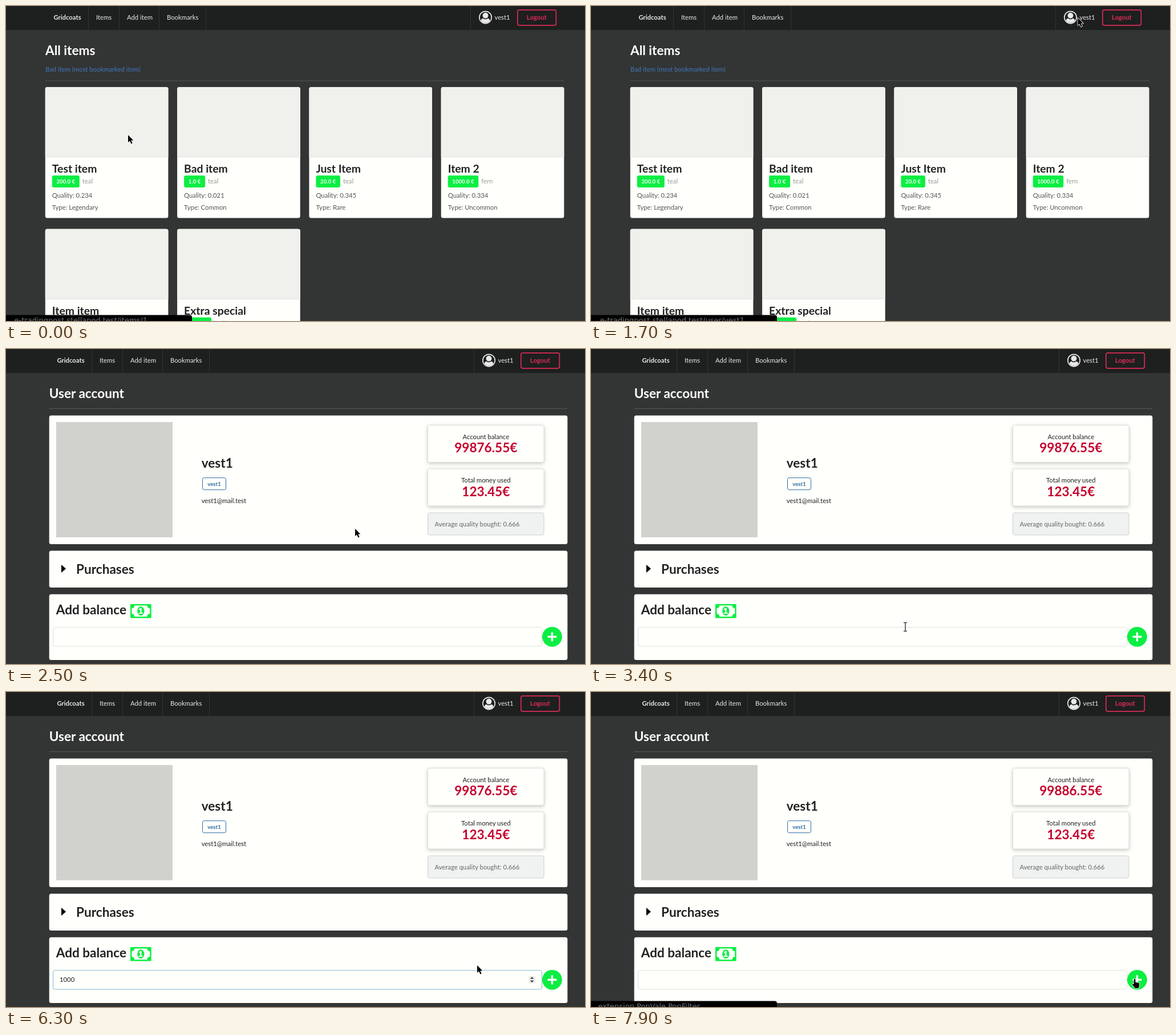
These frames come from a looping animation (1015 px wide and 552 px high, 8 s). An HTML page:

```html
<!DOCTYPE html>
<html lang="en">
<head>
<meta charset="utf-8">
<title>Marketplace account</title>
<style>
  html, body { margin: 0; width: 100%; height: 100%; overflow: hidden; background: #333434; }
  svg { display: block; width: 1015px; height: 552px; font-family: Lato, sans-serif; }
  .raised { filter: drop-shadow(0 2px 3px #22242640); }
  .pointer { fill: #000; stroke: #fff; stroke-width: 1.6; paint-order: stroke; stroke-linejoin: round; }
</style>
</head>
<body>
<svg id="stage" viewBox="0 0 1015 552"></svg>
<script>
const LOOP = 8000, BODY = 11.29, H1 = 22.58, H2 = 19.36, SMALL = 9.68;
const INK = '#212223', PAPER = '#fffffb', GREEN = '#0cee43', RED = '#c5002d', USER = 'vest1';
const HOST = 'e-tradingpost.stellapod.test/';

const text = (x, y, s, { size = BODY, fill = INK, bold, anchor = 'start', id = '' } = {}) =>
  `<text id="${id}" x="${x}" y="${y}" font-size="${size}" font-weight="${bold ? 700 : 400}" fill="${fill}" text-anchor="${anchor}">${s}</text>`;
const rect = (x, y, w, h, fill, r = 0, more = '') =>
  `<rect x="${x}" y="${y}" width="${w}" height="${h}" rx="${r}" fill="${fill}" ${more}/>`;

function nav() {
  const light = '#e9e9e9';
  return [144, 198, 268, 350, 814].map(x => rect(x, 0, 1, 42, '#313232')).join('') +
    text(107.5, 24, 'Gridcoats', { bold: 1, fill: light, anchor: 'middle' }) +
    text(158, 24, 'Items', { fill: light }) +
    text(212, 24, 'Add item', { fill: light }) +
    text(282, 24, 'Bookmarks', { fill: light }) +
    `<g transform="translate(829 8.5) scale(.01283)" fill="${light}">
      <circle cx="896" cy="896" r="832" fill="none" stroke="${light}" stroke-width="128"/>
      <circle cx="896" cy="640" r="384"/>
      <path d="M277 1351q66-327 306-327 131 128 313 128t313-128q240 0 306 327-240 313-619 313t-619-313z"/>
    </g>` +
    text(856.5, 24, USER, { fill: light }) +
    rect(896.8, 6.8, 67.5, 27, 'none', 3, 'stroke="#d92c56" stroke-width="1.7"') +
    text(930.3, 24, 'Logout', { bold: 1, fill: '#d92c56', anchor: 'middle' });
}

function card(col, row, title, price, seller, quality, type) {
  const x = 68.8 + 231.3 * col, y = 142 + 248.8 * row, left = x + 12, w = 9.5 + 5.5 * price.length;
  const soft = { fill: '#555655' };
  return rect(x, y, 215.6, 229.6, PAPER, 3.5) +
    `<path d="M${x} ${y + 122.5}v-119q0-3.5 3.5-3.5h208.6q3.5 0 3.5 3.5v119z" fill="#f0f0ed"/>` +
    rect(x, y + 122, 215.6, 1, '#e2e2df') +
    text(left, y + 150, title, { size: H2, bold: 1 }) +
    rect(left, y + 155, w, 21, GREEN, 3) +
    text(left + w / 2, y + 169, price, { size: SMALL, bold: 1, fill: '#f2fff2', anchor: 'middle' }) +
    text(left + w + 5, y + 169, seller, { fill: '#9a9a98' }) +
    text(left, y + 193.5, 'Quality: ' + quality, soft) +
    text(left, y + 214.6, 'Type: ' + type, soft);
}

const itemsPage = () =>
  text(69, 86, 'All items', { size: H1, bold: 1, fill: '#fff' }) +
  text(69, 115.3, 'Bad item (most bookmarked item)', { fill: '#4079ba' }) +
  rect(69, 130.5, 909.5, 1, '#555656') +
  card(0, 0, 'Test item', '200.0 €', 'teal', '0.234', 'Legendary') +
  card(1, 0, 'Bad item', '1.0 €', 'teal', '0.021', 'Common') +
  card(2, 0, 'Just Item', '20.0 €', 'teal', '0.345', 'Rare') +
  card(3, 0, 'Item 2', '1000.0 €', 'fern', '0.334', 'Uncommon') +
  card(0, 1, 'Item item', '10.0 €', 'teal', '0.200', 'Common') +
  card(1, 1, 'Extra special', '100.0 €', 'teal', '0.500', 'Rare');

function stat(y, label, value, id) {
  return rect(739.5, y, 203.5, 65, PAPER, 3, 'class="raised" stroke="#dcdcd9"') +
    text(841.3, y + 24.2, label, { anchor: 'middle' }) +
    text(841.3, y + 47.6, value, { size: H1, bold: 1, fill: RED, anchor: 'middle', id });
}

const moneyIcon = () => `<g transform="translate(218 447) scale(.0191)" fill="${GREEN}">
  <rect width="1920" height="1280" rx="64"/>
  <path fill="${PAPER}" d="M1792 896V384q-106 0-181-75t-75-181H384q0 106-75 181t-181 75v512q106 0 181 75t75 181h1152q0-106 75-181t181-75z"/>
  <ellipse cx="960" cy="640" rx="320" ry="416"/>
  <path fill="${PAPER}" d="M768 896h384v-96H1024V352H910L762 489l77 80q42-37 55-57h2v288H768z"/></g>`;

const accountPage = () =>
  text(75.7, 86, 'User account', { size: H1, bold: 1, fill: '#fff' }) +
  rect(75.7, 104, 908.5, 1, '#555656') +
  [[116.5, 225.5], [353.5, 64.5], [429.7, 115.3]].map(([y, h]) => rect(75.7, y, 908.6, h, PAPER, 3.5)).join('') +
  rect(88, 128, 204, 202, '#d1d1cd') +
  text(342.7, 208, USER, { size: H1, bold: 1 }) +
  rect(344.5, 225.7, 41, 21, 'none', 3, 'stroke="#2b6ca6"') +
  text(365, 240, USER, { size: SMALL, bold: 1, fill: '#2b6ca6', anchor: 'middle' }) +
  text(342.7, 270.4, USER + '@mail.test') +
  stat(133.5, 'Account balance', '', 'balance') +
  stat(210, 'Total money used', '123.45€', 'used') +
  rect(739.5, 287, 203.5, 39, '#f0f1f1', 3, 'stroke="#cfd0d0"') +
  text(751.5, 311, 'Average quality bought: 0.666', { fill: '#666767' }) +
  '<path d="M97 378l8 7-8 7z"/>' +
  text(123, 394, 'Purchases', { size: H1, bold: 1 }) +
  text(87.7, 464.5, 'Add balance', { size: H1, bold: 1 }) + moneyIcon() +
  rect(82.5, 487.8, 857, 33.2, PAPER, 3, 'id="field" stroke="#dededb"') +
  text(94, 508.4, '', { id: 'amount' }) +
  rect(0, 497, 1, 14, '#111', 0, 'id="caret"') +
  `<g id="spinner">${rect(916, 497.5, 12, 13, '#efefec')}<path d="M918.7 502.7l3.3-3.7 3.3 3.7zM918.7 505.5l3.3 3.7 3.3-3.7z" fill="#444"/></g>` +
  `<circle id="plus" cx="957.4" cy="504.3" r="17.4"/>` +
  '<path d="M950.8 504.3h13.2M957.4 497.7v13.2" stroke="#fff" stroke-width="3.4" stroke-linecap="round"/>';

const statusBar = () => `<g id="status"><path d="M0 541.5h322q4 0 4 4v7h-326z"/>
  <text id="hint" y="555.3" font-size="13" fill="#70767a" text-anchor="end" font-family="DejaVu Sans, sans-serif"></text></g>`;

const beam = 'M-3-7.5h2q1 0 1 1 0-1 1-1h2M0-6.5v13M-3 7.5h2q1 0 1-1 0 1 1 1h2';
const pointers = () => `
  <path id="arrow" class="pointer" d="M0 0v13l3-2.8 2.4 5.2 2.2-1-2.4-5h4.2z"/>
  <path id="hand" class="pointer" d="M-1.4 0q0-1.2 1.4-1.2t1.4 1.2v5q1.5-.8 2.4.3 1.6-.6 2.3.6 2-.3 2 1.6v3q0 2-1.2 3.2v1.3h-7v-1.5l-4-4.5q0-2 1.6-1.6l1.1 1z"/>
  <g id="beam" fill="none"><path d="${beam}" stroke="#fff" stroke-width="2.6"/><path d="${beam}" stroke="#111" stroke-width="1.2"/></g>`;

stage.innerHTML = rect(0, 0, 1015, 552, '#333434') + rect(0, 0, 1015, 42, '#1e1f1f') +
  `<g id="nav">${nav()}</g><g id="items">${itemsPage()}</g><g id="account">${accountPage()}</g>` +
  statusBar() + pointers();

// Each step: start time, then its value
const pointerSteps = [
  [0, 'arrow', 214, 226], [200, 'hand', 214, 226], [400, 'hand', 350, 217], [500, 'hand', 496, 204],
  [700, 'hand', 690, 158], [800, 'arrow', 820, 114], [1100, 'arrow', 836, 78], [1200, 'arrow', 848, 48],
  [1300, 'arrow', 856, 29], [1400, 'arrow', 858, 20], [1600, 'arrow', 855, 20], [1700, 'arrow', 853.5, 21],
  [2100, 'hand', 854, 21], [2400, 'arrow', 740, 170], [2500, 'arrow', 612, 315], [3100, 'arrow', 600, 345],
  [3200, 'arrow', 580, 405], [3300, 'arrow', 562, 455], [3400, 'beam', 551, 487], [3500, 'beam', 543, 502],
  [3600, 'beam', 537, 510], [6100, 'arrow', 751, 459], [6300, 'arrow', 826, 479], [6400, 'beam', 887, 495],
  [6600, 'hand', 946, 502], [6700, 'hand', 953, 504]];
const hintSteps = [
  [0, HOST + 'items/1', 248], [500, HOST + 'items/2', 248], [700, HOST + 'items/3', 248], [1100, '', 0],
  [1600, HOST + 'user/' + USER, 269], [2500, '', 0], [7600, 'extension PopVale PopFilter', 191]];
const amountSteps = [[0, ''], [4500, '1'], [5200, '10'], [5400, '100'], [5800, '1000'], [7900, '']];
const caretSteps = [[0, 0], [3700, 1], [4200, 0], [4500, 1], [4900, 0], [5200, 1], [6100, 0], [6600, 1], [7100, 0]];
const fieldSteps = [[0, '#dededb'], [3700, '#a0c5dd'], [4000, '#85b7d9'], [7100, '#a9c9dd'], [7300, '#dededb']];
const plusSteps = [[0, GREEN], [6600, '#0be040'], [6900, '#0acb3a'], [7100, '#0be040'], [7900, GREEN]];

const at = (steps, t) => steps.findLast(s => s[0] <= t).slice(1);
const $ = id => document.getElementById(id);
const show = (id, on) => $(id).setAttribute('visibility', on ? 'visible' : 'hidden');

function draw(t) {
  const onAccount = t >= 2100;
  show('items', !onAccount);
  $('account').style.display = onAccount ? '' : 'none';
  $('nav').setAttribute('transform', `translate(${onAccount ? 6 : 0})`);

  const [kind, x, y] = at(pointerSteps, t);
  for (const id of ['arrow', 'hand', 'beam']) show(id, id === kind);
  $(kind).setAttribute('transform', `translate(${x} ${y})`);

  const [hint, end] = at(hintSteps, t);
  $('status').style.display = hint ? '' : 'none';
  $('hint').textContent = hint;
  $('hint').setAttribute('x', end);

  const [amount] = at(amountSteps, t);
  $('amount').textContent = amount;
  $('caret').setAttribute('x', 94 + Math.round(6.55 * amount.length));
  show('caret', at(caretSteps, t)[0]);
  show('spinner', t >= 3500 && t < 7400);
  $('field').setAttribute('stroke', at(fieldSteps, t)[0]);
  $('plus').setAttribute('fill', at(plusSteps, t)[0]);
  $('balance').textContent = t < 7900 ? '99876.55€' : '99886.55€';
}

const start = performance.now();
function tick() {
  draw((performance.now() - start) % LOOP);
  requestAnimationFrame(tick);
}
tick();
</script>
</body>
</html>
```
